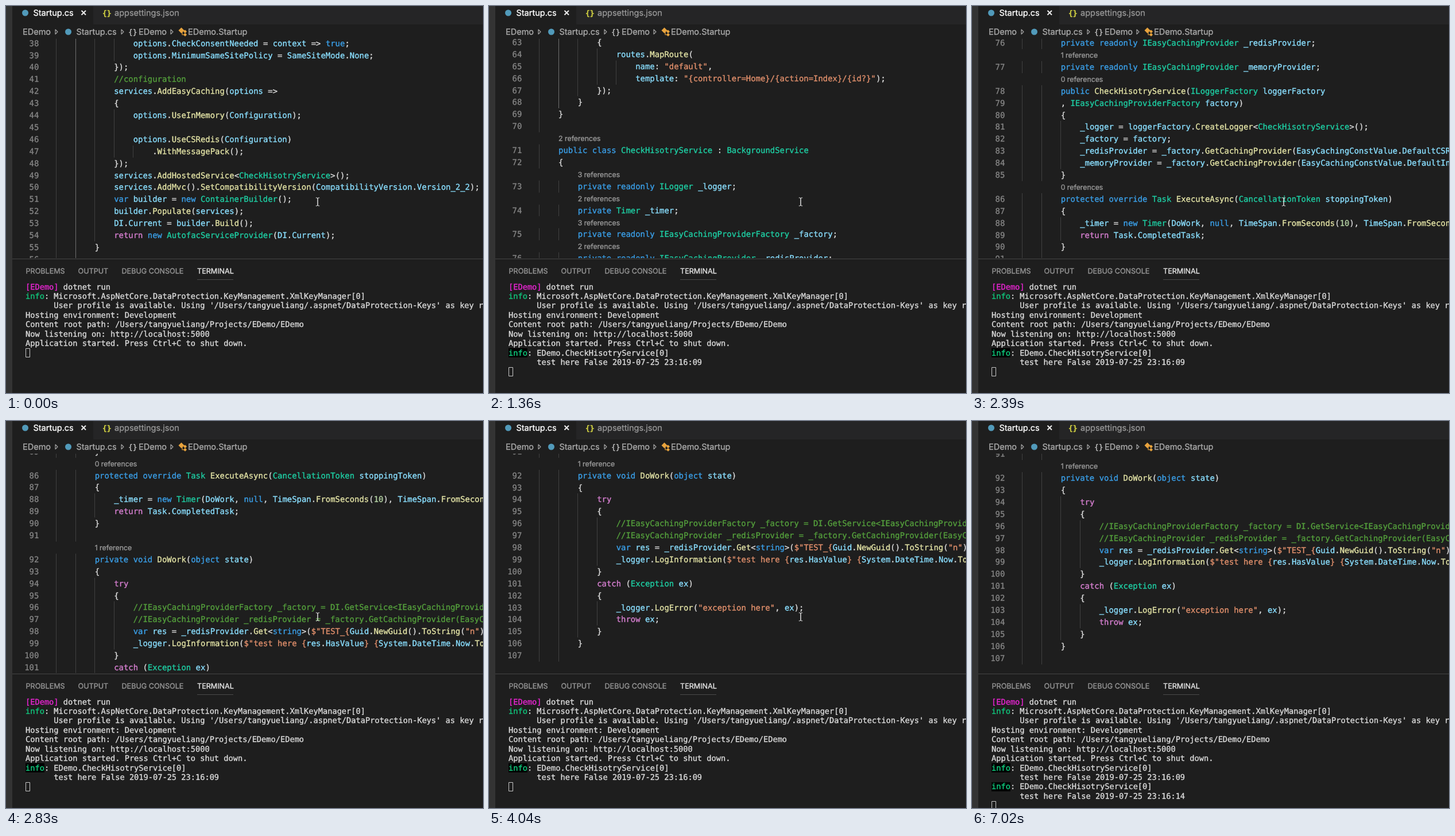
An HTML page with a canvas that plays this animation: 831x674 px, repeating every 8200 ms.

```html
<!DOCTYPE html>
<html lang="en">
<head>
<meta charset="utf-8">
<title>Editor with terminal</title>
<style>
html, body { margin: 0; width: 100%; height: 100%; overflow: hidden; background: #1e1e1e; }
canvas { display: block; }
</style>
</head>
<body>
<canvas id="stage" width="831" height="674"></canvas>
<script>
const ctx = document.getElementById('stage').getContext('2d');
ctx.textRendering = 'geometricPrecision';
ctx.lineJoin = 'round';

const LOOP = 8200;
const TICK = 149.33, FIRST_TICK = 290;
const ROW = 20.9, COL = 8.38, INDENT = COL * 4, CODE_X = 87.6;
const TERM_ROW = 16.43, TERM_COL = 8.22, TERM_X = 34;
const MONO = '"DejaVu Sans Mono", monospace';
const CODE_FONT = '13.92px ' + MONO;
const TERM_FONT = '13.66px ' + MONO;
const UI_FONT = 'Inter, sans-serif';

const colors = {
  comment: '#549f3c', string: '#e2906c', control: '#d67fd0', keyword: '#3a9fe8',
  number: '#b5d3a4', type: '#1ecfa4', func: '#e4e4a6', name: '#8adfff', plain: '#dcdcdc'
};

// Each row: indent level, then code; "@" marks a reference hint without a line number.
const source = `4options.CheckConsentNeeded = context => true;
4options.MinimumSameSitePolicy = SameSiteMode.None;
3});
3//configuration
3services.AddEasyCaching(options =>
3{
4options.UseInMemory(Configuration);
4
4options.UseCSRedis(Configuration)
5.WithMessagePack();
3});
3services.AddHostedService<CheckHisotryService>();
3services.AddMvc().SetCompatibilityVersion(CompatibilityVersion.Version_2_2);
3var builder = new ContainerBuilder();
3builder.Populate(services);
3DI.Current = builder.Build();
3return new AutofacServiceProvider(DI.Current);
2}
2
2@0 references
2public void Configure(IApplicationBuilder app)
2{
3app.UseStaticFiles();
3app.UseCookiePolicy();
3app.UseEasyCaching();
3app.UseMvc(routes =>
3{
4routes.MapRoute(
5name: "default",
5template: "{controller=Home}/{action=Index}/{id?}");
3});
2}
1}
1
1@2 references
1public class CheckHisotryService : BackgroundService
1{
2@3 references
2private readonly ILogger _logger;
2@2 references
2private Timer _timer;
2@3 references
2private readonly IEasyCachingProviderFactory _factory;
2@2 references
2private readonly IEasyCachingProvider _redisProvider;
2@1 reference
2private readonly IEasyCachingProvider _memoryProvider;
2@0 references
2public CheckHisotryService(ILoggerFactory loggerFactory
2, IEasyCachingProviderFactory factory)
2{
3_logger = loggerFactory.CreateLogger<CheckHisotryService>();
3_factory = factory;
3_redisProvider = _factory.GetCachingProvider(EasyCachingConstValue.DefaultCSRedisName);
3_memoryProvider = _factory.GetCachingProvider(EasyCachingConstValue.DefaultInMemoryName);
2}
2@0 references
2protected override Task ExecuteAsync(CancellationToken stoppingToken)
2{
3_timer = new Timer(DoWork, null, TimeSpan.FromSeconds(10), TimeSpan.FromSeconds(5));
3return Task.CompletedTask;
2}
2
2@1 reference
2private void DoWork(object state)
2{
3try
3{
4//IEasyCachingProviderFactory _factory = DI.GetService<IEasyCachingProviderFactory>();
4//IEasyCachingProvider _redisProvider = _factory.GetCachingProvider(EasyCachingConstValue);
4var res = _redisProvider.Get<string>($"TEST_{Guid.NewGuid().ToString("n")}");
4_logger.LogInformation($"test here {res.HasValue} {System.DateTime.Now.ToString()}");
3}
3catch (Exception ex)
3{
4_logger.LogError("exception here", ex);
4throw ex;
3}
2}
2`;

const tokenPattern = new RegExp([
  /(?<comment>\/\/.*)/,
  /(?<string>\$"[^{]*\{|"[^"]*"|\} \{)/,
  /(?<control>\b(?:return|try|catch|throw)\b)/,
  /(?<keyword>\b(?:public|private|protected|override|readonly|class|void|object|string|var|new|null|true)\b)/,
  /(?<number>\b\d+\b)/,
  /(?<type>(?<=(?:new|class|:) |<)[A-Z]\w*|[A-Z]\w*(?= [a-zA-Z_]))/,
  /(?<func>\w+(?=[(<]))/,
  /(?<name>\w+)/,
  /(?<plain>[^\w\s]+?)/
].map(r => r.source).join('|'), 'g');

function tokenize(code) {
  return [...code.matchAll(tokenPattern)].map(m => ({
    text: m[0], col: m.index,
    color: colors[Object.keys(m.groups).find(kind => m.groups[kind] !== undefined)]
  }));
}

let lineNumber = 38;
const rows = source.split('\n').map(line => {
  const level = +line[0], code = line.slice(1);
  return code[0] === '@'
    ? { level, hint: code.slice(1) }
    : { level, number: lineNumber++, tokens: tokenize(code) };
});

// Scroll offset at each tick: three flicks, then a small settle back.
const scrollStops = [
  0, 12, 75, 163, 256.7, 340, 415, 485, 545, 592, 628, 655, 655,
  716.5, 815, 920, 1020, 1100, 1161.3, 1200, 1200,
  1215, 1245, 1272, 1290, 1302, 1307.6, 1307.6, 1307.6, 1303
];

const bootLog = [
  ['[EDemo]', ' dotnet run', '#ea25d4'],
  ['info', ': Microsoft.AspNetCore.DataProtection.KeyManagement.XmlKeyManager[0]', '#10c67c'],
  ['', "      User profile is available. Using '/Users/tangyueliang/.aspnet/DataProtection-Keys' as key repository"],
  ['', 'Hosting environment: Development'],
  ['', 'Content root path: /Users/tangyueliang/Projects/EDemo/EDemo'],
  ['', 'Now listening on: http://localhost:5000'],
  ['', 'Application started. Press Ctrl+C to shut down.']
];
const checkLog = time => [
  ['info', ': EDemo.CheckHisotryService[0]', '#10d080', '#000'],
  ['', '      test here False 2019-07-25 ' + time]
];

function rect(x, y, w, h, color) {
  ctx.fillStyle = color;
  ctx.fillRect(x, y, w, h);
}

// A hairline outline gives the slightly heavy look of smoothed screen type.
function text(str, x, y, font, color, align = 'left') {
  ctx.font = font;
  ctx.fillStyle = ctx.strokeStyle = color;
  ctx.textAlign = align;
  ctx.lineWidth = 0.35;
  ctx.fillText(str, x, y);
  ctx.strokeText(str, x, y);
}

const label = (str, x, y, size, color) => text(str, x, y, `${size}px ${UI_FONT}`, color);

function path(points, color, width, closed) {
  ctx.beginPath();
  points.forEach(([x, y]) => ctx.lineTo(x, y));
  if (closed) ctx.closePath();
  ctx.strokeStyle = color;
  ctx.lineWidth = width;
  ctx.stroke();
}

function dot(x, y, r, color) {
  ctx.beginPath();
  ctx.arc(x, y, r, 0, Math.PI * 2);
  ctx.fillStyle = color;
  ctx.fill();
}

function diamond(x, y, r, color) {
  ctx.beginPath();
  [[0, -r], [r, 0], [0, r], [-r, 0]].forEach(([dx, dy]) => ctx.lineTo(x + dx, y + dy));
  ctx.fillStyle = color;
  ctx.fill();
}

function drawHeader() {
  rect(0, 0, 11, 674, '#333333');
  rect(152, 0, 679, 32, '#252526');
  dot(33.5, 12, 5.5, '#519aba');
  label('Startup.cs', 47.5, 17, 14.5, '#ffffff');
  path([[131.5, 8], [139, 15.5]], '#f0f0f0', 2);
  path([[139, 8], [131.5, 15.5]], '#f0f0f0', 2);
  text('{}', 168, 17, 'bold 13px ' + MONO, '#cbcb41');
  label('appsettings.json', 189, 17, 14.5, '#969696');

  const gray = '#a9a9a9';
  label('EDemo', 29, 50, 14.5, gray);
  dot(108.5, 45, 5.5, '#519aba');
  label('Startup.cs', 122.5, 50, 14.5, gray);
  text('{}', 213, 50, '13px ' + MONO, '#c5c5c5');
  label('EDemo', 231, 50, 14.5, gray);
  label('EDemo.Startup', 317, 50, 14.5, gray);
  for (const x of [86, 201, 287]) path([[x, 41], [x + 4, 45], [x, 49]], gray, 1.1, true);

  const orange = '#e8a33d';
  path([[306, 43], [312, 43]], orange, 1.2);
  path([[307, 44], [307, 50], [311, 50]], orange, 1.2);
  diamond(305.5, 42.5, 5, orange);
  diamond(312, 44.5, 3, orange);
  diamond(312, 50, 3, orange);
}

function drawEditor(scroll) {
  ctx.save();
  ctx.beginPath();
  ctx.rect(11, 57, 820, 382);
  ctx.clip();
  rows.forEach((row, i) => {
    const y = 65 + i * ROW - scroll;
    if (y < 40 || y > 455) return;
    const x = CODE_X + row.level * INDENT;
    const baseline = Math.round(y + 4.6);
    if (row.hint) {
      label(row.hint, x, baseline, 12.3, '#999999');
      return;
    }
    for (let g = 0; g < row.level; g++) {
      const active = g === 1 && row.number < 69;
      const top = Math.round(y - ROW / 2);
      rect(Math.round(87.3 + g * INDENT), top, 1, Math.round(y + ROW / 2) - top,
        active ? '#707070' : '#404040');
    }
    text(row.number, 57.3, baseline, CODE_FONT, '#858585', 'right');
    for (const t of row.tokens) text(t.text, x + t.col * COL, baseline, CODE_FONT, t.color);
  });
  ctx.restore();
}

function drawPanel(log) {
  rect(11, 440, 820, 1, '#454545');
  label('PROBLEMS', 34.5, 466, 12.6, '#979797');
  label('OUTPUT', 125.5, 466, 12.6, '#979797');
  label('DEBUG CONSOLE', 201.5, 466, 12.6, '#979797');
  label('TERMINAL', 333, 466, 12.6, '#e7e7e7');
  rect(333, 476, 63, 1, '#4a4a4a');

  log.forEach(([tag, rest, color, back], i) => {
    const y = 489.3 + i * TERM_ROW;
    const baseline = Math.round(y + 4.2);
    if (back) rect(TERM_X, Math.round(y - 8), tag.length * TERM_COL, 16, back);
    text(tag, TERM_X, baseline, TERM_FONT, color || '#dcdcdc');
    text(rest, TERM_X + tag.length * TERM_COL, baseline, TERM_FONT, '#dcdcdc');
  });
  ctx.strokeStyle = '#c8c8c8';
  ctx.lineWidth = 1;
  ctx.strokeRect(34.5, Math.round(481 + log.length * TERM_ROW) + 0.5, 7, 15);
}

// The pointer rests, leaves through the bottom edge, then briefly arcs back in.
function pointerAt(tick) {
  if (tick < 32) return [543, 341];
  if (tick < 37) {
    const p = (tick - 31) / 5;
    return [543 + 18 * p, 341 + 350 * p * p];
  }
  if (tick < 39 || tick > 44) return null;
  const q = (tick - 39) / 5;
  return [518 + 290 * q, 642 + 24 * (2 * q - 1) ** 2];
}

function drawPointer([x, y]) {
  for (const side of [-1, 1]) {
    const half = [[3.2, -7], [1, -7], [0, -6], [0, 6], [1, 7], [3.2, 7]];
    path(half.map(([dx, dy]) => [x + side * dx, y + dy]), '#e0e0e0', 1);
  }
}

function draw(time) {
  const tick = Math.floor((time - FIRST_TICK) / TICK);
  const stop = Math.max(0, Math.min(tick + 1, scrollStops.length - 1));
  const log = [...bootLog];
  if (tick >= 4) log.push(...checkLog('23:16:09'));
  if (tick >= 36) log.push(...checkLog('23:16:14'));

  rect(0, 0, 831, 674, '#1e1e1e');
  drawHeader();
  drawEditor(scrollStops[stop]);
  drawPanel(log);
  const pointer = pointerAt(tick);
  if (pointer) drawPointer(pointer);
}

const start = performance.now();
function loop() {
  draw((performance.now() - start) % LOOP);
  requestAnimationFrame(loop);
}
loop();
</script>
</body>
</html>
```
